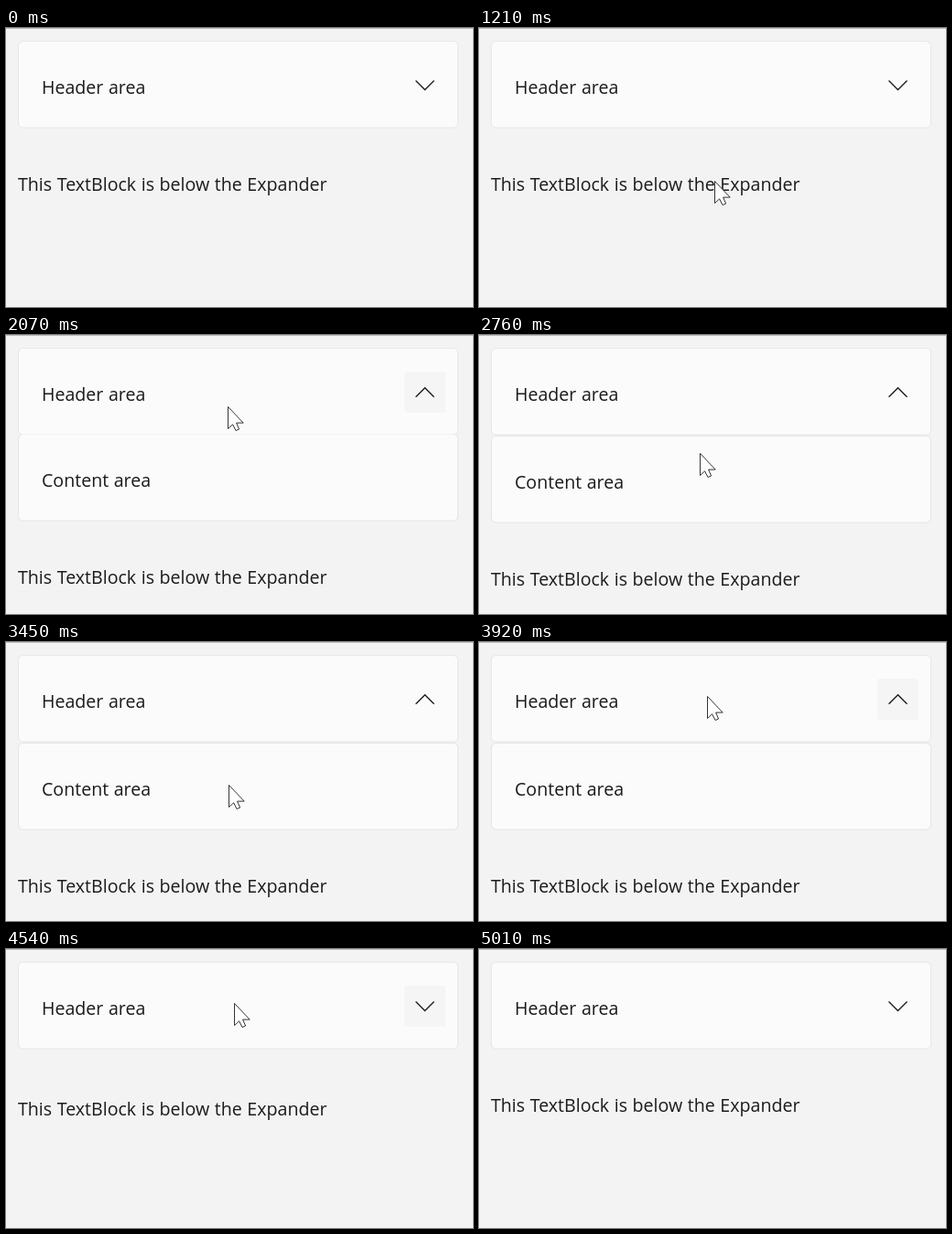
Write an HTML page that moves like this. It is 510 by 305 pixels and loops after 5.87 s.

```html
<!DOCTYPE html>
<html lang="en">
<head>
<meta charset="utf-8">
<title>Expander</title>
<style>
  html, body { margin: 0; width: 100%; height: 100%; overflow: hidden; background: #f3f3f3; }
  svg { display: block; width: 510px; height: 305px; }
  text { font: 19.6px "Open Sans", "Noto Sans", sans-serif; word-spacing: .5px; fill: #1b1b1b; }
  .card { fill: #fbfbfb; stroke: #e7e7e7; }
  #content .card { stroke: #e4e4e4; }
</style>
</head>
<body>
<svg viewBox="0 0 510 305">
  <defs>
    <clipPath id="below"><rect y="109" width="510" height="196"/></clipPath>
  </defs>
  <rect width="510" height="305" fill="#f3f3f3"/>
  <rect width="510" height="1" fill="#bcbcbc"/>

  <rect class="card" x="13.5" y="14.5" width="480" height="94.5" rx="5"/>
  <g clip-path="url(#below)">
    <g id="content">
      <rect class="card" x="13.5" y="110.5" width="480" height="94.5" rx="5"/>
      <text x="39" y="168">Content area</text>
    </g>
  </g>

  <text x="39" y="72">Header area</text>
  <rect id="button" x="435" y="40" width="45" height="45" rx="3"/>
  <path id="chevron" d="M-10 -5.1L0 4.9L10 -5.1" fill="none" stroke-width="1.35"/>
  <text id="note" x="13" y="178">This TextBlock is below the Expander</text>

  <path id="cursor" d="M.5 .5V24.5L5.6 19.8L9 26.5L12.6 25L9.6 18.1H17.2Z"
        fill="#fff" stroke="#111" stroke-width=".85"/>
  <circle id="spot" r="18" fill="#ff0" opacity=".5"/>
</svg>
<script>
const LOOP = 5870;
const STEP = 77.4, PHASE = 1208 % STEP;   // screen refresh
const SHIFT = 96;
const OPEN = 1846, CLOSE = 4368, SLIDE = 367, SPIN = 165;
const PRESSES = [1740, 4220], HOLD = 150;
const ENTER = 1200, LEAVE = 5000;

// Pointer strokes; bow bends the path sideways
const MOVES = [
  { start: 1180, end: 1600, from: [257, 168], to: [242, 78], bow: 0 },
  { start: 2510, end: 2920, from: [242, 78], to: [243, 156], bow: -2 },
  { start: 3380, end: 3910, from: [243, 156], to: [249, 59], bow: 0 },
  { start: 4540, end: 4930, from: [249, 59], to: [368, 280], bow: 0 }
];

const $ = id => document.getElementById(id);
const [content, button, chevron, note, cursor, spot] =
  ["content", "button", "chevron", "note", "cursor", "spot"].map($);

const clamp = v => Math.min(1, Math.max(0, v));
const smooth = k => k * k * (3 - 2 * k);
const curve = (a, b, u) => 3 * a * u * (1 - u) ** 2 + 3 * b * u * u * (1 - u) + u ** 3;

// cubic-bezier(.1, .9, .2, 1)
function ease(x) {
  if (x <= 0 || x >= 1) return clamp(x);
  let lo = 0, hi = 1;
  for (let i = 0; i < 24; i++) {
    const mid = (lo + hi) / 2;
    if (curve(.1, .2, mid) < x) lo = mid; else hi = mid;
  }
  return curve(.9, 1, lo);
}

function pointer(t) {
  const { start, end, from, to, bow } = MOVES.findLast(m => t >= m.start) ?? MOVES[0];
  const k = smooth(clamp((t - start) / (end - start)));
  const [x, y] = from.map((v, i) => v + (to[i] - v) * k);
  return [Math.round(x + bow * Math.sin(Math.PI * k)), Math.round(y)];
}

const place = (el, x, y) => el.setAttribute("transform", `translate(${x} ${y})`);
const show = (el, on) => el.setAttribute("visibility", on ? "visible" : "hidden");
const phase = (t, length, f) => f(clamp((t - OPEN) / length)) - f(clamp((t - CLOSE) / length));

function draw(t) {
  const drop = Math.round(SHIFT * phase(t, SLIDE, ease));
  place(note, 0, drop);
  place(content, 0, drop - SHIFT);
  show(content, t >= OPEN && t < CLOSE);

  const [x, y] = pointer(t);
  const inside = t >= ENTER && t < LEAVE;
  const pressed = PRESSES.some(p => t >= p && t < p + HOLD);
  place(cursor, x, y);
  place(spot, x, y);
  show(cursor, inside);
  show(spot, pressed);

  show(button, inside && y < 109);
  button.setAttribute("fill", pressed ? "#f1f1f1" : "#f5f5f5");
  chevron.setAttribute("stroke", pressed ? "#5d5d5d" : "#1b1b1b");
  chevron.setAttribute("transform",
    `translate(457.5 62.6) rotate(${180 * phase(t, SPIN, v => v)})`);
}

const began = performance.now();
function frame() {
  const t = (performance.now() - began) % LOOP;
  draw(PHASE + STEP * Math.floor((t - PHASE) / STEP));
  requestAnimationFrame(frame);
}
frame();
</script>
</body>
</html>
```
